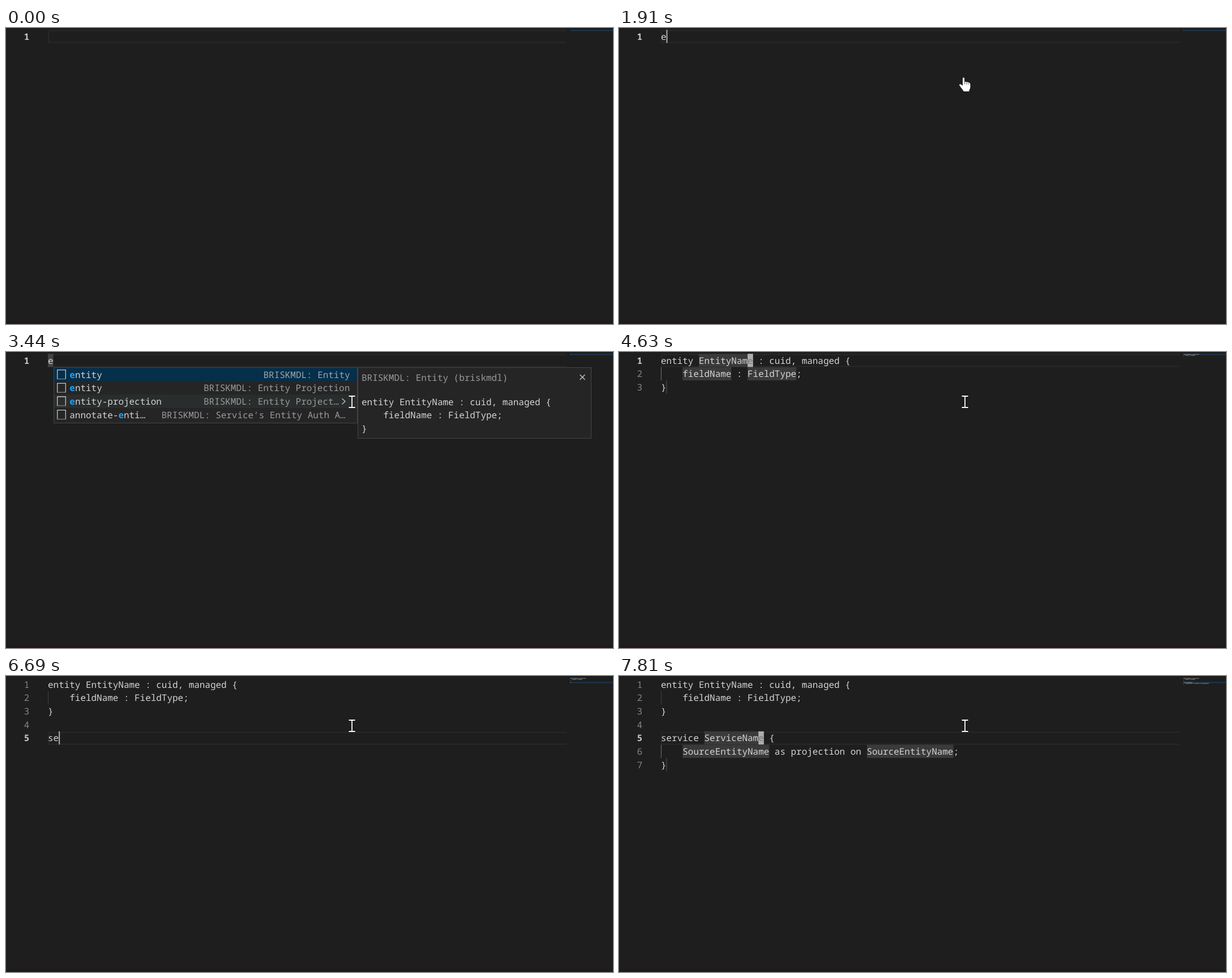
Recreate the animation shown at these times as an HTML page. Size 1072 px wide and 523 px high, loop 8 s.

```html
<!DOCTYPE html>
<html lang="en">
<head>
<meta charset="utf-8">
<title>Snippet editor</title>
<style>
  html, body { margin: 0; width: 100%; height: 100%; overflow: hidden; background: #1e1e1e; }
  svg { display: block; width: 1072px; height: 523px; }
  text {
    font: 15.95px "Noto Sans Mono", "DejaVu Sans Mono", monospace;
    white-space: pre;
    text-rendering: geometricPrecision;
    font-variant-ligatures: none;
  }
</style>
</head>
<body>
<svg id="stage" viewBox="0 0 1072 523" xmlns="http://www.w3.org/2000/svg"></svg>
<script>
const LOOP = 8000;
const LEFT = 74, TOP = 3.2, CHAR = 9.57, ROW = 23.65, BASE = 17.6;
const stage = document.getElementById('stage');

const entity = ['entity EntityName : cuid, managed {', '    fieldName : FieldType;', '}'];
const service = ['service ServiceName {', '    SourceEntityName as projection on SourceEntityName;', '}'];

// [start time, lines]
const documents = [
  [0, ['']],
  [1910, ['e']],
  [3570, entity],
  [5960, [...entity, '']],
  [6230, [...entity, '', '']],
  [6630, [...entity, '', 's']],
  [6690, [...entity, '', 'se']],
  [7410, [...entity, '', ...service]]
];

// [start time, row, column, shape]
const carets = [
  [0, 0, 0, ''], [1100, 0, 0, 'block'], [1500, 0, 0, ''], [1560, 0, 0, 'line'],
  [1910, 0, 1, 'line'], [2360, 0, 1, ''], [2830, 0, 1, 'line'], [3370, 0, 1, ''],
  [3570, 0, 17, 'line'], [3970, 0, 17, ''], [4430, 0, 17, 'line'],
  [4630, 0, 16, 'block'], [4880, 0, 16, ''], [5040, 0, 16, 'block'],
  [5300, 1, 16, 'block'], [5500, 2, 0, 'block'], [5960, 3, 0, 'line'],
  [6230, 4, 0, 'line'], [6630, 4, 1, 'line'], [6690, 4, 2, 'line'], [7210, 4, 2, ''],
  [7410, 4, 19, 'line'], [7810, 4, 18, 'block']
];

// [from, to, row, first column, end column, colour]
const marks = [
  [2240, 3570, 0, 0, 1, '#424344'],
  [7090, 7410, 4, 0, 2, '#3c3f42'],
  [3570, 5500, 0, 7, 17, '#3a3a3a'],
  [3570, 5500, 1, 4, 13, '#3a3a3a'],
  [3570, 5500, 1, 16, 25, '#3a3a3a'],
  [7410, LOOP, 4, 8, 19, '#3a3a3a'],
  [7410, LOOP, 5, 4, 20, '#3a3a3a'],
  [7410, LOOP, 5, 38, 54, '#3a3a3a']
];

const selections = [[3570, 4630, 0, 7, 17], [7410, 7810, 4, 8, 19]];
const endStops = [[3570, 5500, 2], [7410, LOOP, 6]];

const popups = [
  {
    from: 1970, to: 3570, dx: 0, dy: 0, hover: 2,
    // label, match start, match length, detail, detail x
    items: [
      ['entity', 0, 1, 'BRISKMDL: Entity', 454.5],
      ['entity', 0, 1, 'BRISKMDL: Entity Projection', 349],
      ['entity-projection', 0, 1, 'BRISKMDL: Entity Project…', 349],
      ['annotate-enti…', 9, 1, "BRISKMDL: Service's Entity Auth A…", 274.5]
    ],
    title: 'BRISKMDL: Entity (briskmdl)',
    body: entity
  },
  {
    from: 6760, to: 7410, dx: 8.6, dy: 94.6, hover: -1,
    items: [['service', 0, 2, 'BRISKMDL: Service', 444.6]],
    title: 'BRISKMDL: Service (briskmdl)',
    body: [service[0], '    SourceEntityName as projection on', 'SourceEntityName;', '}']
  }
];

const latest = (list, t) => list.filter(item => item[0] <= t).pop();
const during = (t, from, to) => t >= from && t < to;
const colX = col => LEFT + col * CHAR;
const rowY = row => TOP + row * ROW;
const mapX = col => 996.5 + col * 0.82;
const mapY = row => 3.4 + row * 1.8;

const rect = (x, y, w, h, fill, extra = '') =>
  `<rect x="${x}" y="${y}" width="${w}" height="${h}" fill="${fill}" ${extra}/>`;
const text = (x, y, content, fill, extra = '') =>
  `<text x="${x}" y="${y}" fill="${fill}" ${extra}>${content}</text>`;
const line = (d, stroke, width = 1, extra = '') =>
  `<path d="${d}" fill="none" stroke="${stroke}" stroke-width="${width}" ${extra}/>`;

function drawMinimap(lines, activeRow, t) {
  let out = rect(996.5, mapY(activeRow), 75.5, 1.8, '#1c3a54');
  for (const [from, to, row, a, b] of selections) {
    if (during(t, from, to)) out += rect(mapX(a), mapY(row), mapX(b) - mapX(a), 1.8, '#264f78');
  }
  lines.forEach((content, row) => {
    for (const word of content.matchAll(/\S+/g)) {
      out += rect(mapX(word.index), mapY(row) + 0.2, word[0].length * 0.82, 1.2, '#d4d4d4', 'opacity=".48"');
    }
  });
  return out;
}

function drawEditor(t) {
  const lines = latest(documents, t)[1];
  const [, caretRow, caretCol, shape] = latest(carets, t);
  const selected = selections.some(s => during(t, s[0], s[1]));
  let out = '';

  if (!selected) {
    const y = Math.round(rowY(caretRow)) + 1;
    out += line(`M990 ${y + 0.5}H75V${y + 21.5}H990`, '#282828', 2);
  }
  for (const [from, to, row, a, b, fill] of marks) {
    if (during(t, from, to)) out += rect(colX(a), rowY(row), (b - a) * CHAR, ROW - 0.4, fill);
  }
  for (const [from, to, row, a, b] of selections) {
    if (during(t, from, to)) out += rect(colX(a), rowY(row), (b - a) * CHAR, ROW, '#264f78');
  }
  for (const [from, to, row] of endStops) {
    if (during(t, from, to)) out += rect(83.5, rowY(row), 1, ROW - 0.4, '#585858');
  }

  lines.forEach((content, row) => {
    if (content.startsWith(' ')) {
      const lit = during(t, 4630, 5960) && row === 1 || t >= 7810 && row === 5;
      out += rect(74, rowY(row), 1, ROW, lit ? '#707070' : '#404040');
    }
    const active = row === caretRow;
    const baseline = rowY(row) + BASE;
    out += text(41.3, baseline, row + 1, active ? '#c6c6c6' : '#858585',
      `text-anchor="end" font-weight="${active ? 600 : 400}" style="font-weight:${active ? 600 : 400}"`);
    out += text(LEFT, baseline, content, '#d4d4d4');
  });

  const x = colX(caretCol), y = rowY(caretRow);
  if (shape === 'line') out += rect(x, y, 2, ROW - 0.4, '#aeafad');
  if (shape === 'block') {
    out += rect(x, y, CHAR, ROW - 0.4, '#aeafad');
    out += text(x, y + BASE, lines[caretRow][caretCol] || '', '#787878');
  }
  return out + drawMinimap(lines, caretRow, t);
}

function drawItem([label, start, length, detail, detailX], i, hover) {
  const y = 28 + i * ROW, baseline = y + 17.8, end = start + length;
  const fill = i === 0 ? '#062f4a' : i === hover ? '#2a2d2e' : '';
  const match = `<tspan fill="#18a3ff" style="font-weight:700">${label.slice(start, end)}</tspan>`;
  let out = fill ? rect(85, y, 535, ROW, fill) : '';
  out += line(`M90.7 ${y + 19}V${y + 3.7}H105.3V${y + 19}`, '#c5c5c5', 1.3);
  out += line(`M90 ${y + 19.6}H106`, '#c5c5c5', 1.3, 'stroke-dasharray="1.3 1.1"');
  out += text(112.3, baseline, label.slice(0, start) + match + label.slice(end), '#d4d4d4');
  out += text(detailX, baseline, detail, i === 0 ? '#9aa7b0' : '#9a9a9a');
  if (i === hover) out += line(`M593.5 ${y + 7}l5.5 5l-5.5 5`, '#c5c5c5', 1.3);
  return out;
}

function drawPopup({ dx, dy, hover, items, title, body }) {
  const frame = 'stroke="#454545"';
  let out = rect(84.5, 27.5, 536, 3.4 + items.length * ROW, '#252526', frame);
  out += items.map((item, i) => drawItem(item, i, hover)).join('');
  out += rect(621.5, 27.5, 412, 54 + body.length * ROW, '#252526', frame);
  out += text(628, 50.8, title, '#9a9a9a');
  out += line('M1013.5 40l9 9m0 -9l-9 9', '#c5c5c5', 1.3);
  body.forEach((content, i) => out += text(628, 93.9 + i * 23.4, content, '#d4d4d4'));
  return `<g transform="translate(${dx} ${dy})">${out}</g>`;
}

function pointerAt(t) {
  if (during(t, 960, 1030)) return [617, 90];
  const step = Math.min(8, Math.floor((t - 130) / 71.25 + 1e-6));
  const left = (1 - step / 8) ** 2;
  return [611 + 274 * left, 88 + 346 * left];
}

function drawPointer(t) {
  if (t < 130) return '';
  if (during(t, 1910, 3440)) {
    return `<path fill="#fff" d="M607 88.5q1.5 -2 3 0v7q1.5 -1.6 3 .2q1.6 -1.2 3 .6q2 -.8 2.6 .9q1.8 -.2 1.8 1.8
      v5.5q0 3 -2 5.5v2h-9.5l-2.4 -3.5l-5.2 -7q-.6 -2.2 1.5 -2.2q2 .5 4.2 3z"/>` +
      line('M610.3 95v4.5M613.4 96v3.8M616.5 97v3.2', '#1e1e1e', 0.7);
  }
  const [x, y] = pointerAt(t);
  const beam = `M${x - 5.5} ${y - 10}h4.5l1 .8l1 -.8h4.5M${x} ${y - 9.2}v18.4M${x - 5.5} ${y + 10}h4.5l1 -.8l1 .8h4.5`;
  return line(beam, '#111', 3.2, 'opacity=".6"') + line(beam, '#fff', 1.8);
}

function scene(t) {
  return rect(0, 0, 1072, 523, '#1e1e1e') +
    rect(0, 0, 1072, 1, '#191919') +
    rect(0, 519, 1072, 4, '#20181b') +
    drawEditor(t) +
    popups.filter(p => during(t, p.from, p.to)).map(drawPopup).join('') +
    drawPointer(t);
}

let shown = '';
const startTime = performance.now();
function update() {
  const markup = scene((performance.now() - startTime) % LOOP);
  if (markup !== shown) stage.innerHTML = shown = markup;
  requestAnimationFrame(update);
}
update();
</script>
</body>
</html>
```
